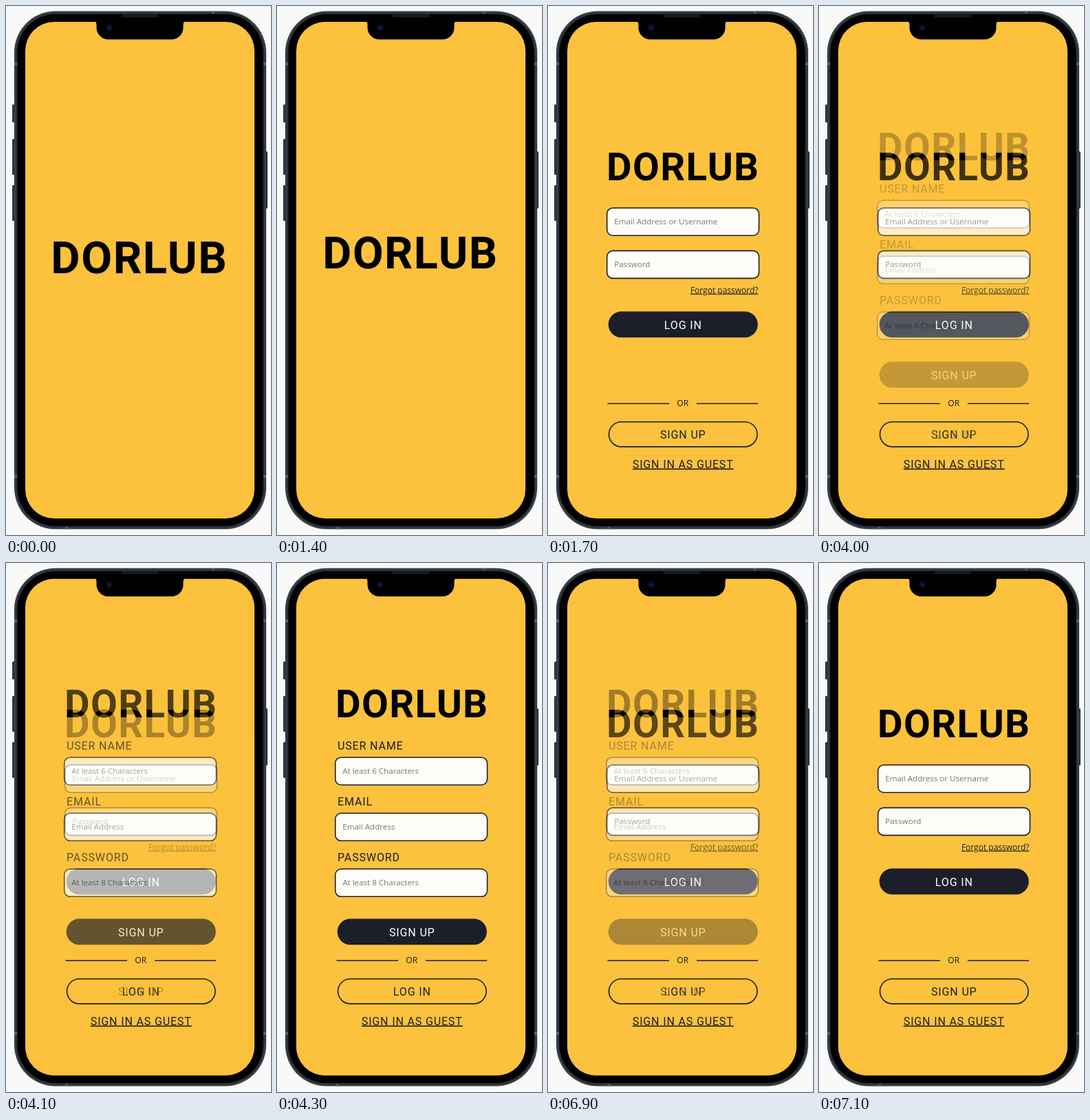
An HTML page that plays this animation: 385x768 px, repeating every 8 s.

```html
<!DOCTYPE html>
<html lang="en">
<head>
<meta charset="utf-8">
<title>Music app sign-in</title>
<style>
  html, body { margin: 0; width: 100%; height: 100%; overflow: hidden; background: #f9f9f9; }
  svg { display: block; width: 100%; height: 100%; }
  .label { font: 16px Roboto, sans-serif; letter-spacing: .85px; fill: #1c1f2a; }
  .hint { font: 11.6px "Open Sans", sans-serif; fill: #777; }
  .small { font: 12px "Open Sans", sans-serif; fill: #1c1f2a; }
  .brand { font: bold 65px Roboto, sans-serif; letter-spacing: 1.6px; }
  .middle { text-anchor: middle; }
  .label.light { fill: #fff; }
  .outline { stroke: #1c1f2a; stroke-width: 1.6; }
</style>
</head>
<body>
<svg viewBox="0 0 385 768">
  <defs>
    <clipPath id="screenClip"><rect x="28" y="23" width="333" height="721" rx="42"/></clipPath>
    <radialGradient id="lens">
      <stop offset="0" stop-color="#22235c"/>
      <stop offset=".5" stop-color="#0d0d2a"/>
      <stop offset="1" stop-color="#050509"/>
    </radialGradient>
  </defs>

  <g fill="#30383e">
    <rect x="9" y="143" width="6" height="26" rx="1.5"/>
    <rect x="9" y="193" width="6" height="52" rx="1.5"/>
    <rect x="9" y="260" width="6" height="52" rx="1.5"/>
    <rect x="375" y="211" width="5" height="83" rx="1.5"/>
  </g>
  <rect x="12" y="7.5" width="366" height="752" rx="60" fill="#283036"/>
  <rect x="13.5" y="9" width="363" height="749" rx="58.5" fill="none" stroke="#414b52" stroke-width="1.2"/>
  <path d="M12 84h4M374 84h4M12 683h4M374 683h4M301 7.5v3M88 756.5v3" stroke="#59636a" stroke-width="4"/>
  <rect x="16.5" y="12" width="357" height="743" rx="55.5"/>

  <g id="screens" clip-path="url(#screenClip)"></g>

  <path d="M127 22h135q-4.500 0-4.500 5v4.500a17 17 0 0 1-17 17h-92a17 17 0 0 1-17-17v-4.500q0-5-4.500-5z"/>
  <rect x="167" y="12" width="55" height="4.500" rx="2.200" fill="#17191b"/>
  <circle cx="150" cy="31.500" r="5.500" fill="url(#lens)"/>
</svg>

<script>
const SCREEN_HEIGHT = 721;
const STEP = 100;

const text = (x, y, content, classes, attrs = "") =>
  `<text x="${x}" y="${y}" class="${classes}" ${attrs}>${content}</text>`;

const field = (x, y, hint) =>
  `<rect x="${x}" y="${y}" width="220.800" height="40" rx="8.500" fill="#fefdf9" class="outline"/>` +
  text(x + 10.5, y + 23.7, hint, "hint");

const button = (y, content, filled) =>
  `<rect x="88.500" y="${y}" width="215.500" height="36.200" rx="18.100" class="outline" fill="${filled ? "#1c1f2a" : "none"}"/>` +
  text(196.3, y + 24.5, content, "label middle" + (filled ? " light" : ""));

const footer = action =>
  '<path d="M86.500 577.300H176M216 577.300H305" class="outline"/>' +
  text(195.7, 581, "OR", "small middle") +
  button(603.7, action, false) +
  text(196.2, 670.5, "SIGN IN AS GUEST", "label middle", 'text-decoration="underline"');

const screen = (id, form) => `<g id="${id}">
  <rect x="28" y="23" width="333" height="${SCREEN_HEIGHT}" fill="#fcc23d"/>
  <g class="logo">${text(0.8, 23, "DORLUB", "brand middle")}</g>
  <g class="form">${form}</g></g>`;

const loginForm =
  field(85.7, 293.2, "Email Address or Username") +
  field(85.7, 355.4, "Password") +
  text(305.5, 416.6, "Forgot password?", "small", 'text-anchor="end" text-decoration="underline"') +
  button(444.2, "LOG IN", true) +
  footer("SIGN UP");

const signupForm =
  text(88, 271, "USER NAME", "label") + field(84.7, 282.2, "At least 6 Characters") +
  text(88, 352, "EMAIL", "label") + field(84.7, 363.3, "Email Address") +
  text(88, 433, "PASSWORD", "label") + field(84.7, 444.3, "At least 8 Characters") +
  button(517.2, "SIGN UP", true) +
  footer("LOG IN");

const screens = document.getElementById("screens");
screens.innerHTML = screen("signup", signupForm) + screen("login", loginForm);
const signup = document.getElementById("signup");
const login = document.getElementById("login");

const mix = (a, b, p) => a + (b - a) * p;

function placeLogo(owner, x, y, scale) {
  owner.querySelector(".logo").setAttribute("transform", `translate(${x} ${y}) scale(${scale})`);
}

// Eased transitions advance in held steps and then stay complete.
function progress(time, start, values) {
  return time < start ? 0 : values[Math.floor((time - start) / STEP)] ?? 1;
}

placeLogo(signup, 195.5, 204, 0.865);

function draw(time) {
  const entry = progress(time, 1400, [0.05, 0.54, 0.87]);
  const toSignup = progress(time, 4000, [0.25, 0.68, 0.95]);
  const toLogin = progress(time, 6800, [0.2, 0.64, 0.93]);
  const returning = time >= 6800;

  placeLogo(login, mix(193, 195.5, entry), mix(365, 232.7, entry), mix(1, 0.865, entry));
  login.querySelector(".form").setAttribute("transform", `translate(0 ${(1 - entry) * SCREEN_HEIGHT})`);

  const top = returning ? login : signup;
  if (screens.lastElementChild !== top) screens.append(top);
  signup.setAttribute("opacity", returning ? 1 : toSignup);
  login.setAttribute("opacity", returning ? toLogin : 1);
}

const startTime = performance.now();
function tick() {
  draw((performance.now() - startTime) % 8000);
  requestAnimationFrame(tick);
}
tick();
</script>
</body>
</html>
```
